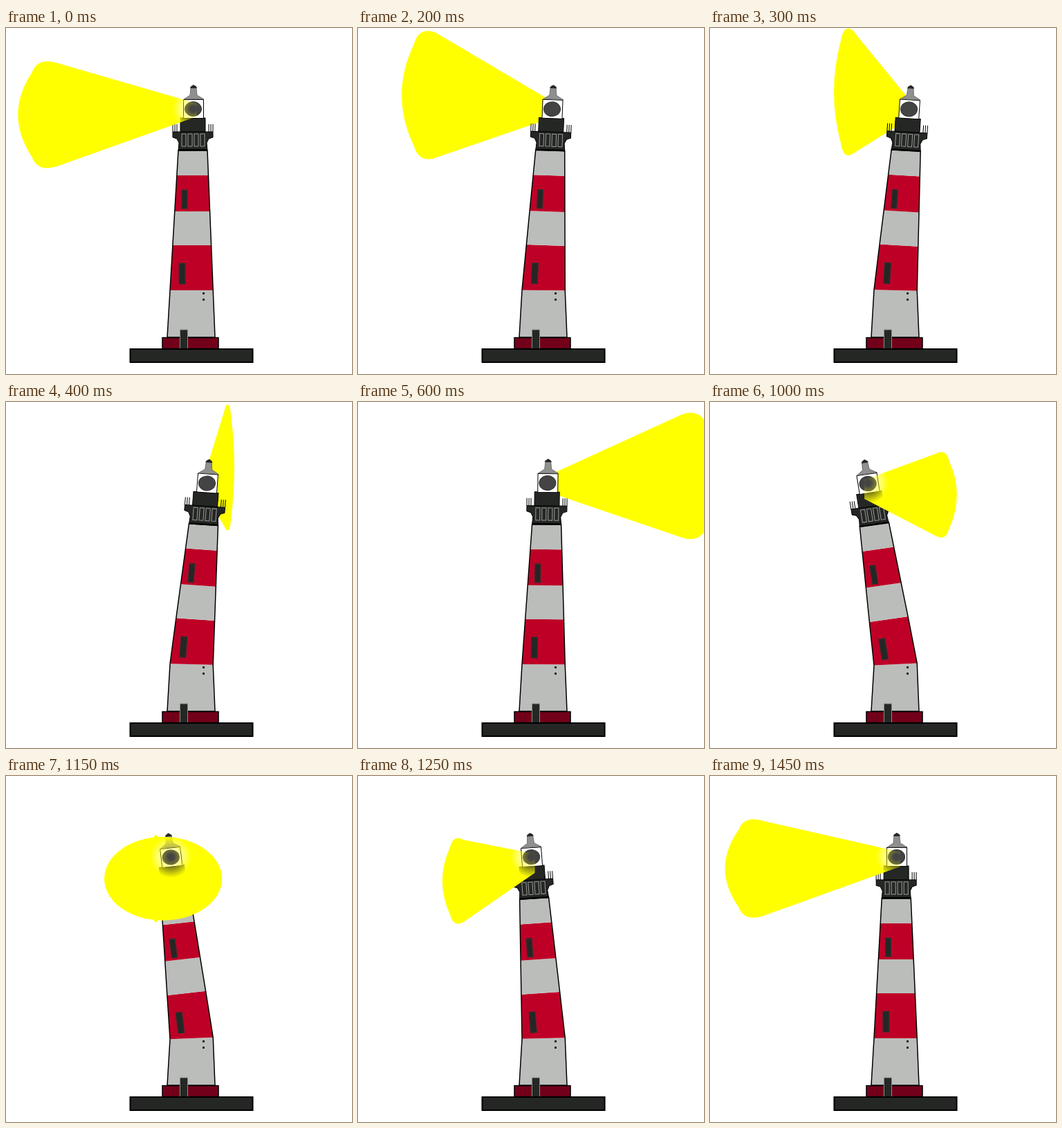
An HTML page with a canvas that plays this animation: 500 by 500 pixels, repeating every 1.5 s.

```html
<!DOCTYPE html>
<html lang="en">
<head>
<meta charset="utf-8">
<title>Swaying lighthouse</title>
<style>
  html, body { margin: 0; width: 100%; height: 100%; overflow: hidden; background: #fff; }
  canvas { display: block; }
</style>
</head>
<body>
<canvas id="stage" width="500" height="500"></canvas>
<script>
const ctx = document.getElementById('stage').getContext('2d');
const LOOP = 1500, STEP = 50;
const DARK = '#252725', GRAY = '#bbbdba', RED = '#be0027', YELLOW = '#ffff00';
const HINGE = { x: 268, y: 379 }, LAMP = { x: 270.5, y: 117 };

// time and sideways shift of the lamp at each turning point
const SWAY = [[0, 0], [400, 20], [980, -42.5], [LOOP, 0]];

function swayAt(t) {
  const i = SWAY.findIndex(([time]) => time > t);
  const [t0, from] = SWAY[i - 1], [t1, to] = SWAY[i];
  return from + (to - from) * (1 - Math.cos(Math.PI * (t - t0) / (t1 - t0))) / 2;
}

function paint(fill, stroke, width = 1) {
  if (fill) { ctx.fillStyle = fill; ctx.fill(); }
  if (stroke) { ctx.strokeStyle = stroke; ctx.lineWidth = width; ctx.stroke(); }
}

function poly(points, fill, stroke, width) {
  ctx.beginPath();
  points.forEach(([x, y]) => ctx.lineTo(x, y));
  ctx.closePath();
  paint(fill, stroke, width);
}

function box(x, y, w, h, fill, stroke, width) {
  ctx.beginPath();
  ctx.rect(x, y, w, h);
  paint(fill, stroke, width);
}

// The beam circles the lamp once per loop: left, behind, right, in front.
function drawBeam(t, lampX, behind) {
  const turn = 2 * Math.PI * t / LOOP;
  const depth = Math.sin(turn), toward = Math.max(0, -depth);
  const reach = -213 * Math.cos(turn) - (behind ? 40 * Math.sin(2 * turn) : 0);
  const side = Math.tanh(reach / 20);
  const bulge = .17 * reach + 4 * side;
  const half = 78 + 18 * depth + 4 * Math.sin(3 * turn);
  const midY = 120 - 27 * Math.sin(turn - .2) - 7 * Math.sin(2 * turn);
  const top = midY - half, bottom = midY + half;
  const nearX = lampX - 5 * side, cornerX = lampX + reach;
  const edge = cornerX + .5 * bulge, inner = cornerX - .38 * bulge, outer = cornerX + .3 * bulge;

  ctx.beginPath();
  ctx.moveTo(nearX, 109 + 4 * toward);
  ctx.lineTo(inner, top + 3);
  ctx.quadraticCurveTo(outer, top - 5, edge, top + .22 * half);
  ctx.quadraticCurveTo(cornerX + 1.5 * bulge, midY, edge, bottom - .22 * half);
  ctx.quadraticCurveTo(outer, bottom + 5, inner, bottom - 3);
  ctx.lineTo(nearX, 128 + 14 * toward);
  ctx.closePath();

  let fill = YELLOW;
  if (!behind) {
    // light facing the viewer widens into a disc
    const facing = Math.max(0, 1 - (reach / 95) ** 2);
    const discX = lampX + reach / 2;
    ctx.moveTo(discX + 90 * facing, midY);
    ctx.ellipse(discX, midY, 90 * facing, half * facing, 0, 0, 2 * Math.PI, reach < 0);
    fill = ctx.createRadialGradient(lampX, LAMP.y, 4, lampX, LAMP.y, 30);
    fill.addColorStop(0, 'rgba(255,255,0,0)');
    fill.addColorStop(1, YELLOW);
  }
  paint(fill);
}

function drawTower(lean) {
  const warp = (x, y) => {
    const up = Math.min(0, y - HINGE.y);
    const tilt = up ? .35 + .65 * Math.min(1, -up / 65) : .35 * (y === HINGE.y);
    return [x - lean * up, y + .89 * lean * tilt * (x - HINGE.x)];
  };
  const rings = [447, 379, 314, 265, 213, 177].map(y => {
    const up = (447 - y) / 270;
    return [warp(233 + 16 * up, y), warp(302 - 11 * up, y)];
  });
  for (let i = 0; i < 5; i++) {
    const a = rings[i], b = rings[i + 1];
    poly([a[0], a[1], b[1], b[0]], i % 2 ? RED : GRAY);
  }
  poly([...rings.map(r => r[0]), ...rings.map(r => r[1]).reverse()], null, '#000', 1.5);
}

function drawHead() {
  box(254, 234, 8, 27, DARK, '#3a302f');
  box(250, 340, 9, 30, DARK, '#3a302f');

  poly([[241, 150], [299, 150], [299, 158], [293, 160], [290, 166], [291, 177],
        [249, 177], [250, 166], [247, 160], [241, 158]], DARK, '#000');
  box(252, 130, 36, 20, DARK, '#000');
  for (let i = 0; i < 4; i++) box(254 + 9 * i, 153, 6, 18, null, '#999b99');
  box(249, 175, 42, 2, '#000');
  for (const out of [23, 26, 29])
    for (const x of [270 - out, 270 + out]) box(x - .5, 139, 1, 11, '#000');

  box(256.5, 103.5, 29, 27, '#fff', '#000');
  ctx.beginPath();
  ctx.ellipse(LAMP.x, LAMP.y, 12, 10.5, 0, 0, 2 * Math.PI);
  paint('#444', '#333');
  poly([[257, 103], [286, 103], [276, 97], [275, 86], [267, 86], [266, 97]], '#8f8f8f', '#555', .7);
  poly([[266, 87], [267, 84.5], [271, 82], [275, 84.5], [276, 87]], DARK);
}

function drawGround() {
  box(226, 447.5, 81, 16, '#73001a', '#000', 1.5);
  box(251.5, 436, 11, 27.5, DARK, '#8b8b8b');
  for (const y of [382, 391]) box(284, y, 3, 3, DARK);
  box(179.5, 464, 177, 19, DARK, '#000', 2);
}

function draw(t) {
  const shift = swayAt(t);
  const lean = shift / (HINGE.y - LAMP.y);
  const behind = t > 0 && t < LOOP / 2;

  ctx.fillStyle = '#fff';
  ctx.fillRect(0, 0, 500, 500);
  if (behind) drawBeam(t, LAMP.x + shift, true);
  drawTower(lean);
  ctx.save();
  ctx.translate(HINGE.x, HINGE.y);
  ctx.transform(1, .89 * lean, -lean, 1 - .2 * lean * lean, 0, 0);
  ctx.translate(-HINGE.x, -HINGE.y);
  drawHead();
  ctx.restore();
  drawGround();
  if (!behind) drawBeam(t, LAMP.x + shift, false);
}

const start = performance.now();
function tick() {
  const t = (performance.now() - start) % LOOP;
  draw(Math.floor(t / STEP) * STEP);
  requestAnimationFrame(tick);
}
tick();
</script>
</body>
</html>
```
